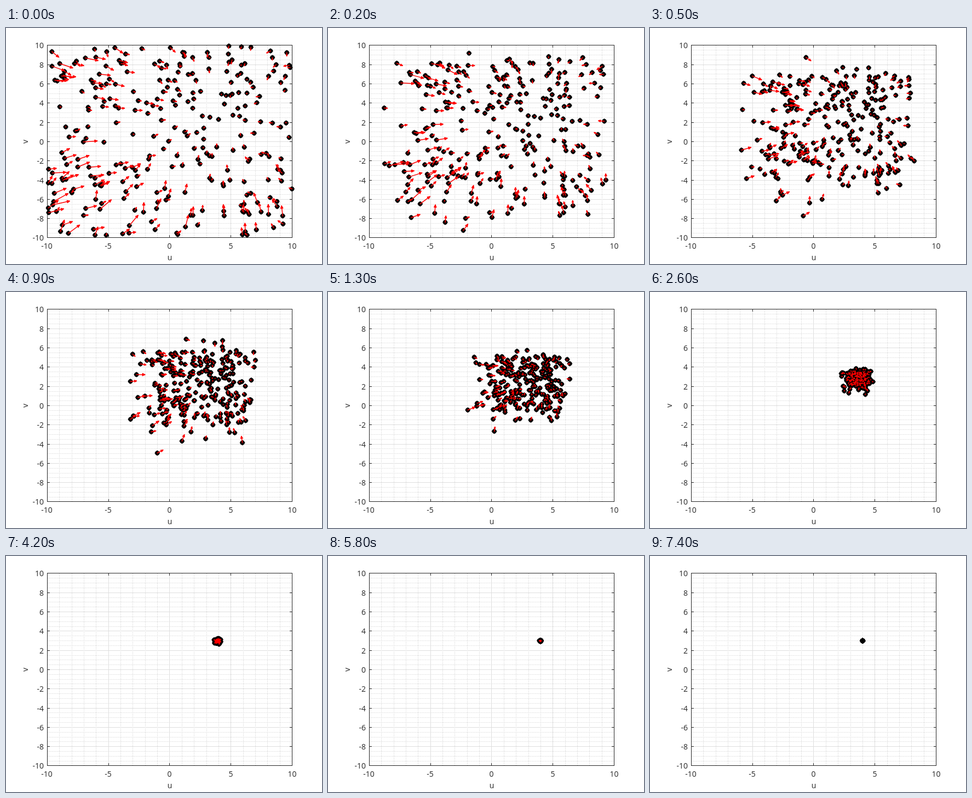
Write an HTML page with a canvas that moves like this. It is 577 by 433 pixels and loops after 8.4 s.

```html
<!DOCTYPE html>
<html lang="en">
<head>
<meta charset="utf-8">
<title>Swarm convergence</title>
<style>
  html, body { margin: 0; width: 100%; height: 100%; overflow: hidden; background: #fff; }
  canvas { display: block; }
</style>
</head>
<body>
<canvas id="stage" width="577" height="433"></canvas>
<script>
const ctx = document.getElementById('stage').getContext('2d');
const LEFT = 75.5, TOP = 32, RIGHT = 522.5, BOTTOM = 385;
const LOOP = 8400, STEPS = 73, COUNT = 280;
const GOAL = [4, 3];
const MAX_RATE = 0.19, ARROW_SCALE = 0.55;
const INK = '#262626';

const px = u => LEFT + (u + 10) * (RIGHT - LEFT) / 20;
const py = v => BOTTOM - (v + 10) * (BOTTOM - TOP) / 20;
const snap = n => Math.ceil(n - 1) + 0.5;

let seed = 20177;
function random() {
  seed = (seed + 0x6D2B79F5) | 0;
  let n = Math.imul(seed ^ (seed >>> 15), 1 | seed);
  n = (n + Math.imul(n ^ (n >>> 7), 61 | n)) ^ n;
  return ((n ^ (n >>> 14)) >>> 0) / 4294967296;
}

// Each axis closes a random share of its remaining distance at every step
function makePath() {
  let point = GOAL.map(() => random() * 20 - 10);
  const path = [];
  for (let k = 0; k <= STEPS + 1; k++) {
    path.push([px(point[0]), py(point[1])]);
    point = point.map((p, axis) => p + (GOAL[axis] - p) * MAX_RATE * random());
  }
  return path;
}
const paths = Array.from({ length: COUNT }, makePath);

function line(x1, y1, x2, y2) {
  ctx.beginPath();
  ctx.moveTo(x1, y1);
  ctx.lineTo(x2, y2);
  ctx.stroke();
}

const column = u => line(snap(px(u)), TOP, snap(px(u)), BOTTOM);
const row = v => line(LEFT, snap(py(v)), RIGHT, snap(py(v)));

function drawAxes() {
  const top = snap(TOP), bottom = snap(BOTTOM);
  ctx.fillStyle = '#fff';
  ctx.fillRect(0, 0, 577, 433);
  ctx.lineWidth = 1;
  ctx.lineCap = 'butt';
  ctx.lineJoin = 'miter';

  ctx.strokeStyle = '#c6c6c6';
  ctx.setLineDash([1, 2]);
  for (let u = -9; u < 10; u++) if (u % 5) column(u);
  for (let v = -9.5; v < 10; v += 0.5) if (v % 2) row(v);
  ctx.setLineDash([]);
  ctx.strokeStyle = '#dedede';
  for (let u = -5; u < 10; u += 5) column(u);
  for (let v = -8; v < 10; v += 2) row(v);

  ctx.strokeStyle = ctx.fillStyle = INK;
  ctx.strokeRect(LEFT, top, RIGHT - LEFT, bottom - top);
  ctx.font = '14px "Open Sans", "Noto Sans", sans-serif';
  ctx.textAlign = 'center';
  for (let u = -10; u <= 10; u += 5) {
    const x = snap(px(u));
    line(x, bottom, x, bottom - 4.5);
    line(x, top, x, top + 4.5);
    ctx.fillText(u, x - (u < 0 ? 1 : 0), 405);
  }
  ctx.textAlign = 'right';
  for (let v = -10; v <= 10; v += 2) {
    const y = snap(py(v));
    line(LEFT, y, LEFT + 4.5, y);
    line(RIGHT, y, RIGHT - 4.5, y);
    ctx.fillText(v, 69, y + 5);
  }
  ctx.textAlign = 'center';
  ctx.fillText('u', 299, 426);
  ctx.save();
  ctx.translate(40, 208.5);
  ctx.rotate(-Math.PI / 2);
  ctx.fillText('v', 0, 0);
  ctx.restore();
}

// A round blob with four slight points
function drawMarker([x, y]) {
  const r = 5;
  ctx.beginPath();
  ctx.arc(x, y, 4.2, 0, 2 * Math.PI);
  ctx.fill();
  ctx.beginPath();
  ctx.moveTo(x - r, y);
  ctx.lineTo(x, y - r);
  ctx.lineTo(x + r, y);
  ctx.lineTo(x, y + r);
  ctx.fill();
}

function drawArrow([x, y], [nextX, nextY]) {
  const dx = (nextX - x) * ARROW_SCALE, dy = (nextY - y) * ARROW_SCALE;
  const length = Math.hypot(dx, dy);
  if (length < 0.03) return;
  const tipX = x + dx, tipY = y + dy;
  const angle = Math.atan2(dy, dx);
  const head = Math.min(5, length * 0.35);
  const barb = turn => [tipX - head * Math.cos(angle + turn), tipY - head * Math.sin(angle + turn)];
  line(x, y, tipX, tipY);
  ctx.beginPath();
  ctx.moveTo(...barb(0.42));
  ctx.lineTo(tipX, tipY);
  ctx.lineTo(...barb(-0.42));
  ctx.closePath();
  ctx.fill();
  ctx.stroke();
}

function drawSwarm(step) {
  ctx.fillStyle = '#000';
  for (const path of paths) drawMarker(path[step]);
  if (step === STEPS) return;
  ctx.lineCap = ctx.lineJoin = 'round';
  ctx.lineWidth = 1.5;
  ctx.fillStyle = ctx.strokeStyle = '#f00';
  for (const path of paths) drawArrow(path[step], path[step + 1]);
}

// The tenth tick repeats the one before it
function stepAt(time) {
  const tick = Math.floor(time / 100);
  return Math.min(STEPS, tick < 10 ? tick : tick - 1);
}

let shown = -1;
function render() {
  const step = stepAt(performance.now() % LOOP);
  if (step !== shown) {
    drawAxes();
    drawSwarm(step);
    shown = step;
  }
  requestAnimationFrame(render);
}
render();
</script>
</body>
</html>
```
